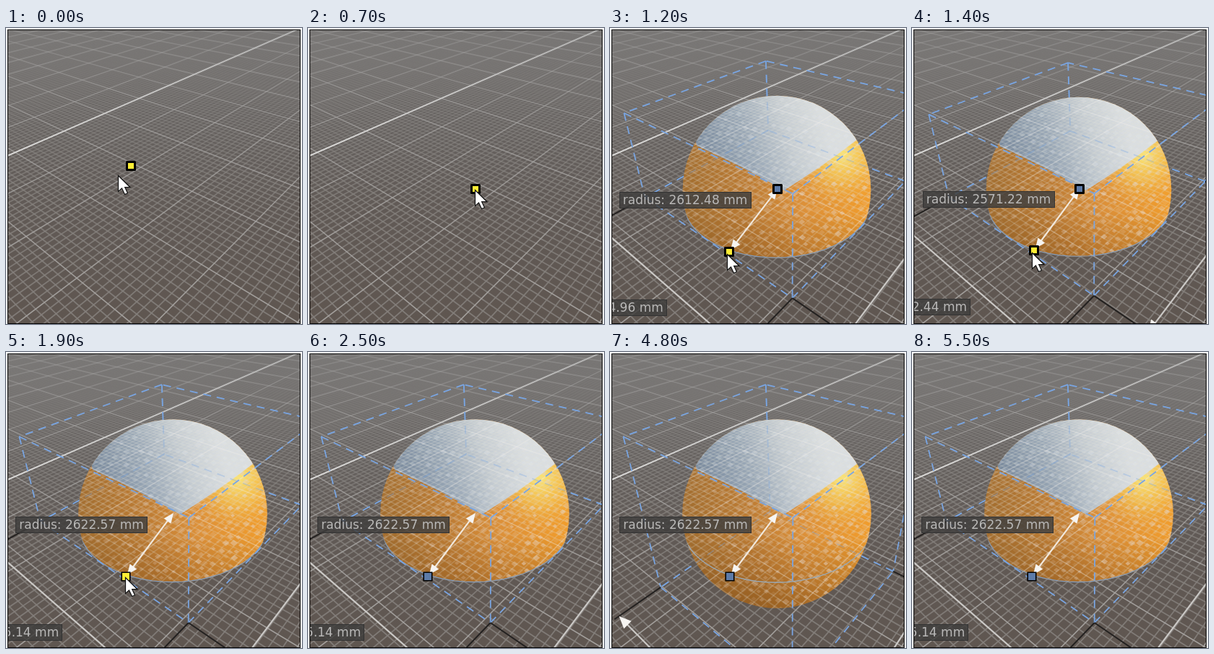
An HTML page with a canvas for the animation above (6500 ms loop, 410 by 410 pixels).

```html
<!DOCTYPE html>
<html lang="en">
<head>
<meta charset="utf-8">
<title>Dome radius tool</title>
<style>
  html, body { margin: 0; width: 100%; height: 100%; overflow: hidden; background: #fff; }
  canvas { display: block; width: 410px; height: 410px; }
</style>
</head>
<body>
<canvas id="view" width="410" height="410"></canvas>
<script>
const SIZE = 410, LOOP = 6500;
const ctx = document.getElementById('view').getContext('2d');

// Perspective: vanishing point and weight of each world axis, in major grid units
const ORIGIN = [117, 235];
const AXES = [
  { x: 764, y: -155, k: 0.121 },
  { x: -455, y: -109, k: -0.1114 },
  { x: 250, y: 1050, k: -0.0968 }
];
const CENTRE = [0.868, 0.758];
const CENTRE_PX = [232, 223];
const UNITS_PER_MM = 5e-4;
const DOME_R = 131, DOME_UNITS = 1.313;
const BLUE = '#79a5e2';

function project(u, v, w = 0) {
  let [x, y] = ORIGIN, d = 1;
  [u, v, w].forEach((c, i) => {
    const a = AXES[i], k = a.k * c;
    x += a.x * k;
    y += a.y * k;
    d += k;
  });
  return [x / d, y / d];
}

const mix = (a, b, t) => a + (b - a) * t;
const mixPoint = (p, q, t) => [mix(p[0], q[0], t), mix(p[1], q[1], t)];
const rand = n => {
  const s = Math.sin(n * 12.9898) * 43758.5453;
  return s - Math.floor(s);
};

function line(c, p, q) {
  c.beginPath();
  c.moveTo(...p);
  c.lineTo(...q);
  c.stroke();
}

function polygon(c, points) {
  points.forEach((p, i) => i ? c.lineTo(...p) : c.moveTo(...p));
  c.closePath();
}

function gradient(c, x0, y0, x1, y1, stops) {
  const g = c.createLinearGradient(x0, y0, x1, y1);
  stops.forEach(([at, color]) => g.addColorStop(at, color));
  return g;
}

function layer(draw) {
  const canvas = document.createElement('canvas');
  canvas.width = canvas.height = SIZE;
  draw(canvas.getContext('2d'));
  return canvas;
}

function drawGrid(c, minor, major, axis) {
  const pass = (isMajor, color, width) => {
    c.strokeStyle = color;
    c.lineWidth = width;
    for (let i = -20; i <= 120; i++)
      if ((i % 10 === 0) === isMajor) line(c, project(i / 10, -13), project(i / 10, 3.6));
    for (let i = -130; i <= 36; i++)
      if ((i % 10 === 0) === isMajor) line(c, project(-2, i / 10), project(12, i / 10));
  };
  pass(false, minor, 1.8);
  pass(true, major, 1.6);
  c.strokeStyle = axis;
  c.lineWidth = 2;
  line(c, project(-2, -2), project(12, -2));
}

const ground = layer(c => {
  c.fillStyle = gradient(c, 0, 0, 0, SIZE,
    [[0, '#72706f'], [0.3, '#666260'], [0.6, '#615a56'], [1, '#5f5650']]);
  c.fillRect(0, 0, SIZE, SIZE);
  drawGrid(c,
    gradient(c, 0, 0, 0, SIZE, [[0, 'rgba(135,133,131,.12)'], [0.3, 'rgba(138,135,132,.42)'],
      [0.55, 'rgba(135,131,127,.7)'], [1, 'rgba(132,127,123,.9)']]),
    gradient(c, 0, 0, 0, SIZE, [[0, 'rgba(165,164,163,.35)'], [0.35, 'rgba(168,166,164,.7)'],
      [1, 'rgba(168,165,162,.95)']]),
    gradient(c, 0, 0, 0, 180, [[0, 'rgba(190,190,189,.8)'], [1, '#d8d7d5']]));
});

const overlay = layer(c => drawGrid(c, 'rgba(225,222,216,.2)', 'rgba(240,238,232,.35)', 'rgba(255,255,255,.35)'));

// Rows of small lozenges, in the space of a full-size sphere
function drawTexture(c, color, seed) {
  c.fillStyle = color;
  let n = seed;
  for (let row = -13; row <= 13; row++) {
    for (let col = -13; col <= 13; col++) {
      n++;
      const x = col * 11 + (row % 2) * 5.5 + rand(n) * 3;
      const y = row * 10 + col * 1.5 + rand(n + 900) * 3;
      const s = 2.8 + rand(n + 1800) * 2.5;
      c.globalAlpha = 0.12 + rand(n + 2700) * 0.45;
      c.beginPath();
      polygon(c, [[x - s, y], [x, y - s * 0.8], [x + s, y], [x, y + s * 0.8]]);
      c.fill();
    }
  }
  c.globalAlpha = 1;
}

function drawDome(r, full) {
  const k = r / DOME_UNITS;
  const cx = CENTRE_PX[0] - k, cy = CENTRE_PX[1] + k;
  const ring = [];
  for (let i = 0; i < 72; i++) {
    const a = i * Math.PI / 36;
    ring.push(project(CENTRE[0] + r * Math.cos(a), CENTRE[1] + r * Math.sin(a)));
  }
  ctx.save();
  ctx.beginPath();
  ctx.arc(cx, cy, DOME_R * k, 0, 7);
  ctx.clip();
  if (!full) {
    ctx.beginPath();
    ctx.rect(0, 0, SIZE, cy + 4 * k);
    polygon(ctx, ring);
    ctx.clip();
  }

  ctx.save();
  ctx.translate(cx, cy);
  ctx.scale(k, k);
  ctx.fillStyle = gradient(ctx, -115, 25, 125, 0,
    [[0, '#a56f30'], [0.35, '#bf7d34'], [0.62, '#dc9039'], [1, '#f09c2c']]);
  ctx.fillRect(-140, -140, 280, 280);
  ctx.fillStyle = gradient(ctx, 0, 30, 0, 130, [[0, 'rgba(120,72,20,0)'], [1, 'rgba(120,72,20,.55)']]);
  ctx.fillRect(-140, -140, 280, 280);

  // lit side
  const glow = ctx.createRadialGradient(90, -50, 5, 90, -50, 74);
  glow.addColorStop(0, 'rgba(250,228,118,.95)');
  glow.addColorStop(0.45, 'rgba(248,206,88,.6)');
  glow.addColorStop(1, 'rgba(240,165,60,0)');
  ctx.fillStyle = glow;
  ctx.beginPath();
  polygon(ctx, [[10, 1], [111, -69], [145, -69], [145, 70], [12, 70]]);
  ctx.fill();
  drawTexture(ctx, gradient(ctx, -120, 0, 80, 0,
    [[0, 'rgba(214,178,148,.5)'], [1, '#e6d2c0']]), 1);

  // top face
  ctx.beginPath();
  ctx.moveTo(-111, -61);
  ctx.quadraticCurveTo(-50, -34, 10, 1);
  ctx.quadraticCurveTo(62, -31, 111, -69);
  ctx.lineTo(140, -140);
  ctx.lineTo(-140, -140);
  ctx.closePath();
  ctx.clip();
  ctx.fillStyle = gradient(ctx, -110, -40, 65, -95,
    [[0, '#75869a'], [0.4, '#98a6b5'], [0.72, '#c5ccd2'], [1, '#dadee1']]);
  ctx.fillRect(-140, -140, 280, 180);
  drawTexture(ctx, 'rgba(230,234,238,.5)', 77);
  ctx.restore();

  ctx.drawImage(overlay, 0, 0);

  // front half of the base ring
  ctx.beginPath();
  ctx.rect(0, cy + 8 * k, SIZE, SIZE);
  ctx.clip();
  ctx.strokeStyle = full ? '#9ba9b4' : '#7f9cc0';
  ctx.lineWidth = full ? 1.4 : 2.4;
  ctx.beginPath();
  polygon(ctx, ring);
  ctx.stroke();
  ctx.restore();
}

// Edges meeting at the far bottom corner are hidden by the dome
function drawBox(r, low, hidden) {
  const signs = [[-1, -1], [-1, 1], [1, 1], [1, -1]];
  const corner = (i, w) => project(CENTRE[0] + signs[i % 4][0] * r, CENTRE[1] + signs[i % 4][1] * r, w);
  ctx.strokeStyle = BLUE;
  ctx.lineWidth = 1.8;
  ctx.setLineDash([11, 8]);
  for (let i = 0; i < 4; i++) {
    if ((i >= 2) === hidden) line(ctx, corner(i, low), corner(i + 1, low));
    if ((i === 3) === hidden) line(ctx, corner(i, r), corner(i, low));
    if (!hidden) line(ctx, corner(i, r), corner(i + 1, r));
  }
  ctx.setLineDash([]);
}

function arrowHead(tip, from, size) {
  ctx.save();
  ctx.translate(...tip);
  ctx.rotate(Math.atan2(tip[1] - from[1], tip[0] - from[0]));
  ctx.beginPath();
  polygon(ctx, [[0, 0], [-size, -size * 0.43], [-size, size * 0.43]]);
  ctx.fill();
  ctx.restore();
}

function doubleArrow(p, q, color, size) {
  ctx.strokeStyle = color;
  ctx.fillStyle = '#f6f4f1';
  ctx.lineWidth = 2.2;
  line(ctx, mixPoint(p, q, 0.06), mixPoint(q, p, 0.06));
  arrowHead(p, q, size);
  arrowHead(q, p, size);
}

function label(text, x, y) {
  ctx.font = '17px "DejaVu Sans", sans-serif';
  ctx.textAlign = 'center';
  ctx.textBaseline = 'alphabetic';
  const w = Math.round(ctx.measureText(text).width) + 10;
  const left = Math.round(x - w / 2), top = Math.round(y - 11.5);
  ctx.fillStyle = 'rgba(64,62,61,.84)';
  ctx.fillRect(left, top, w, 23);
  ctx.strokeStyle = '#333';
  ctx.lineWidth = 1;
  ctx.strokeRect(left + 0.5, top + 0.5, w - 1, 22);
  ctx.fillStyle = '#b9b8b7';
  ctx.fillText(text, x, top + 17);
}

function drawDimensions(r, low, mm) {
  const [u, v] = CENTRE;
  const du = 0.72, dv = 0.62, color = '#cbc9c6';
  ctx.strokeStyle = '#232120';
  ctx.lineWidth = 2;
  for (const s of [-1, 1]) {
    line(ctx, project(u - r, v + s * r, low), project(u - r - du * 1.1, v + s * r, low));
    line(ctx, project(u + s * r, v + r, low), project(u + s * r, v + r + dv * 1.1, low));
  }
  doubleArrow(project(u - r - du, v - r, low), project(u - r - du, v + r, low), color, 17);
  doubleArrow(project(u - r, v + r + dv, low), project(u + r, v + r + dv, low), color, 17);
  const [x, y] = project(u - r - du, v, low);
  label((mm * 2).toFixed(2) + ' mm', x - 43, y + 45);
}

function handle([x, y], color, thick) {
  const s = thick ? 11 : 11.5;
  ctx.fillStyle = color;
  ctx.strokeStyle = '#000';
  ctx.lineJoin = thick ? 'round' : 'miter';
  ctx.lineWidth = thick ? 3 : 1.6;
  ctx.beginPath();
  ctx.rect(x - s / 2, y - s / 2, s, s);
  ctx.fill();
  ctx.stroke();
  ctx.lineJoin = 'miter';
}

function cursor([x, y]) {
  ctx.save();
  ctx.translate(x + 0.5, y + 0.5);
  ctx.beginPath();
  polygon(ctx, [[0, 0], [0, 22], [5, 17.5], [9, 26], [13, 24.3], [9.2, 16.2], [16.5, 16.2]]);
  ctx.fillStyle = '#fff';
  ctx.strokeStyle = '#111';
  ctx.lineWidth = 1.2;
  ctx.fill();
  ctx.stroke();
  ctx.restore();
}

// start time, radius in mm, handle position, cursor tip
const DRAG = [
  [800, 820, [209, 247], [206, 251]],
  [900, 1860, [183, 283], [180, 287]],
  [1000, 2630.374, [164, 310], [161, 314]],
  [1100, 2632.1, [164, 310], [161, 314]],
  [1200, 2612.48, [165, 310], [162, 313]],
  [1300, 2590.36, [167, 309], [164, 312]],
  [1400, 2571.22, [169, 308], [166, 311]],
  [1900, 2622.57, [166, 311], [165, 312]]
];
const EXIT = [[2300, [268, 275]], [2400, [389, 222]], [2500, null]];

const latest = (list, t) => list.filter(row => row[0] <= t).pop();

function draw(t) {
  ctx.fillStyle = '#fff';
  ctx.fillRect(0, 0, SIZE, SIZE);
  ctx.save();
  ctx.beginPath();
  ctx.rect(2, 2, 406, 408);
  ctx.clip();
  ctx.drawImage(ground, 0, 0);

  const step = latest(DRAG, t);
  if (!step) {
    const k = Math.min(7, Math.floor(t / 100)) / 7;
    handle(mixPoint([173, 191], CENTRE_PX, k), '#ffee35', true);
    cursor(mixPoint([155, 204], [231, 224], k));
  } else {
    const [start, mm, grip, tip] = step;
    const full = t >= 4800 && t < 5500;
    const r = mm * UNITS_PER_MM, low = full ? -r : 0;
    const left = latest(EXIT, t);
    drawBox(r, low, true);
    drawDome(r, full);
    ctx.globalAlpha = 0.35;
    drawBox(r, low, true);
    ctx.globalAlpha = 1;
    drawBox(r, low, false);
    drawDimensions(r, low, mm);
    doubleArrow(CENTRE_PX, mixPoint(grip, CENTRE_PX, 0.03), '#f1e8dc', 14);
    const mid = mixPoint(CENTRE_PX, grip, 0.5);
    label('radius: ' + mm.toFixed(2) + ' mm', mid[0] - 94.5, mid[1] - 28);
    if (start < 1900) handle(CENTRE_PX, '#5d7ba8', true);
    handle(grip, left ? '#5d7ba8' : '#ffee35', start < 1900);
    const pointer = left ? left[1] : tip;
    if (pointer) cursor(pointer);
  }
  ctx.restore();
  ctx.strokeStyle = '#000';
  ctx.lineWidth = 1;
  ctx.strokeRect(2.5, 2.5, 405, 407);
}

const begin = performance.now();
function tick() {
  draw((performance.now() - begin) % LOOP);
  requestAnimationFrame(tick);
}
tick();
</script>
</body>
</html>
```
